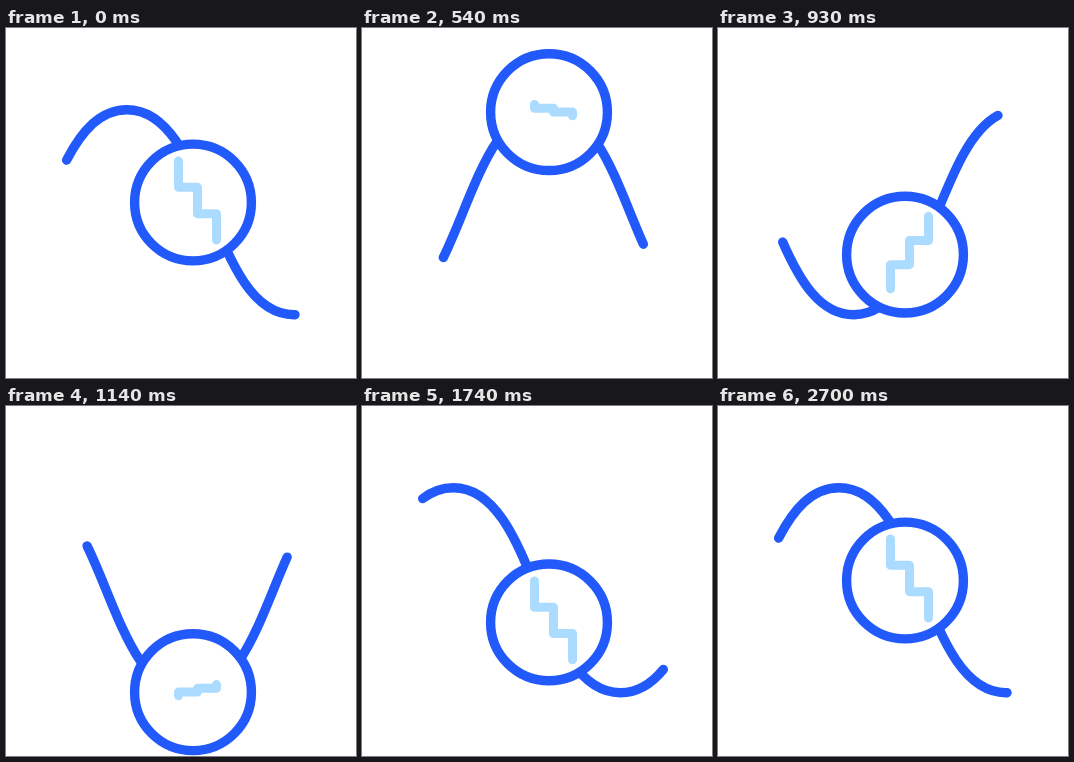
Write an HTML page that moves like this. It is 350x350 px and loops after 2810 ms.

```html
<!DOCTYPE html>
<html lang="en">
<head>
<meta charset="utf-8">
<title>Wave lens</title>
<style>
  html, body { margin: 0; width: 100%; height: 100%; overflow: hidden; background: #fff; }
  svg { display: block; width: 100%; height: 100%; }
  path, circle { fill: none; stroke: #2259fb; stroke-width: 9.4; stroke-linecap: round; stroke-linejoin: round; }
  circle { fill: #fff; }
  #steps { stroke: #abdcff; stroke-width: 9; }
</style>
</head>
<body>
<svg viewBox="0 0 350 350">
  <path id="wave" pathLength="1680" stroke-dasharray="364 3000"/>
  <g id="lens">
    <circle cx="187" r="58.4"/>
    <path id="steps"/>
  </g>
</svg>
<script>
const LOOP = 2810, MOVE = 2700;
const HALF = 167, HALF_LENGTH = 280;
const [wave, lens, steps] = ['wave', 'lens', 'steps'].map(id => document.getElementById(id));

const bend = dy => `c83.5 0 83.5 ${dy} ${HALF} ${dy}`;
wave.setAttribute('d', `M${-4 * HALF} 81.7` + (bend(205) + bend(-205)).repeat(3));

// Cubic Bézier easing with handles (x1, 0) and (x2, 1)
function ease(x, x1, x2) {
  let low = 0, high = 1;
  for (let i = 0; i < 24; i++) {
    const u = (low + high) / 2, v = 1 - u;
    if (3 * v * v * u * x1 + 3 * v * u * u * x2 + u ** 3 < x) low = u;
    else high = u;
  }
  return low * low * (3 - 2 * low);
}

// Keys are [time, value, x1, x2]; the handles shape the way to the next key
function track(keys, time) {
  if (time <= keys[0][0]) return keys[0][1];
  for (let i = 1; i < keys.length; i++) {
    const [t0, v0, x1 = 1 / 3, x2 = 2 / 3] = keys[i - 1], [t1, v1] = keys[i];
    if (time < t1) return v0 + (v1 - v0) * ease((time - t0) / (t1 - t0), x1, x2);
  }
  return keys[keys.length - 1][1];
}

const travel = [[0, 0, 1 / 3, 0.2], [MOVE, 1]];
const lensY = [[0, 174.5], [555, 84], [1142, 286.2, 0.26, 0.25], [MOVE, 174.5]];
const stepHeight = [[283, 26.3], [854, -26.3], [1488, 26.3]];

function draw(time) {
  const p = track(travel, time), h = track(stepHeight, time);
  wave.setAttribute('transform', `translate(${121 + 2 * HALF * p})`);
  wave.setAttribute('stroke-dashoffset', 2 * HALF_LENGTH * p - 1037);
  lens.setAttribute('transform', `translate(0 ${track(lensY, time)})`);
  steps.setAttribute('d', `M172.5 ${-2 - 1.5 * h}v${h}h19v${h}h19v${h}`);
}

const start = performance.now();
function tick() {
  draw((performance.now() - start) % LOOP);
  requestAnimationFrame(tick);
}
tick();
</script>
</body>
</html>
```
